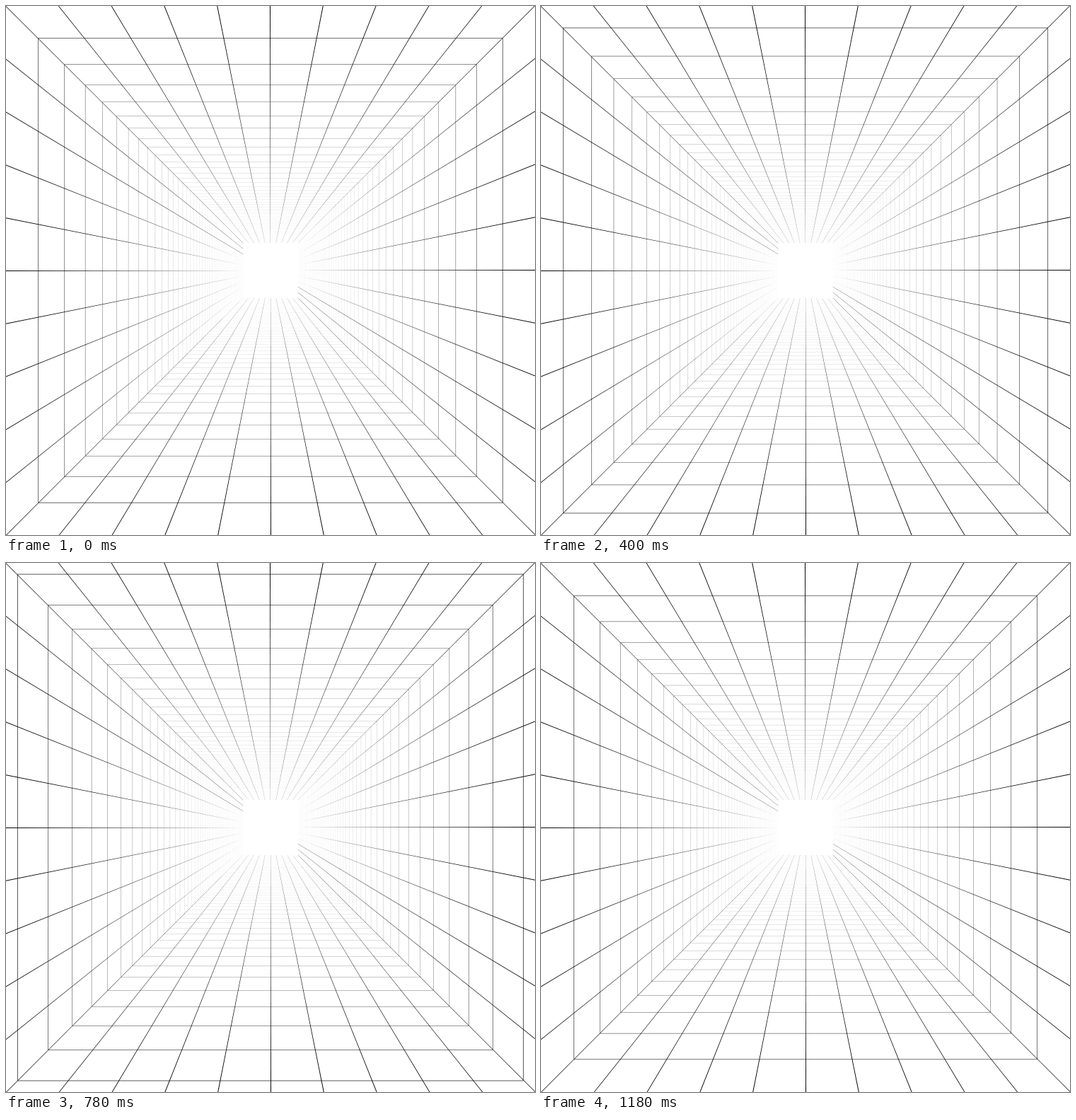
An HTML page with a canvas for the animation above (1.2 s loop, 748 px wide and 748 px high).

```html
<!DOCTYPE html>
<html lang="en">
<head>
<meta charset="utf-8">
<title>Grid tunnel</title>
<style>
  html, body { margin: 0; width: 100%; height: 100%; overflow: hidden; background: #fff; }
  canvas { display: block; width: 748px; height: 748px; }
</style>
</head>
<body>
<canvas id="stage" width="748" height="748"></canvas>
<script>
const SIZE = 748, HALF = SIZE / 2, CELL = SIZE / 10;
const LOOP = 1200;
const FOCAL = 2591;         // radius = FOCAL / depth, depth in cells
const NEAR = 7.893;         // depth of the first ring at the loop start
const FAR = 66.93;          // depth of the tunnel's end
const END = FOCAL / FAR / HALF;
const ctx = document.getElementById('stage').getContext('2d');

// Quarter turns that carry the top wall to the right, bottom and left.
const TURNS = [[1, 0, 0, 1], [0, 1, -1, 0], [-1, 0, 0, -1], [0, -1, 1, 0]];

function drawRails() {
  for (let i = 1; i <= 10; i++) {
    const x = i * CELL - HALF;
    ctx.beginPath();
    ctx.moveTo(x - 1, -HALF);
    ctx.lineTo(x, -HALF);
    ctx.lineTo(x * END, -HALF * END);
    ctx.lineTo((x - 1) * END, -HALF * END);
    ctx.fill();
  }
}

function drawRungs(shift, nudge) {
  for (let z = NEAR - shift; z < FAR; z++) {
    const r = FOCAL / z;
    const thick = r * r / FOCAL / CELL;
    ctx.fillRect(-r, -r - nudge - thick / 2, 2 * r, thick);
  }
}

function draw(now) {
  const shift = (now % LOOP) / LOOP;
  ctx.setTransform(1, 0, 0, 1, 0, 0);
  ctx.fillStyle = '#fff';
  ctx.fillRect(0, 0, SIZE, SIZE);
  ctx.fillStyle = '#000';
  TURNS.forEach((turn, side) => {
    ctx.setTransform(...turn, HALF, HALF);
    drawRungs(shift, side % 2 ? 0 : 0.3);
    drawRails();
  });
}

let start;
function tick(now) {
  start ??= now;
  draw(now - start);
  requestAnimationFrame(tick);
}
draw(0);
requestAnimationFrame(tick);
</script>
</body>
</html>
```
